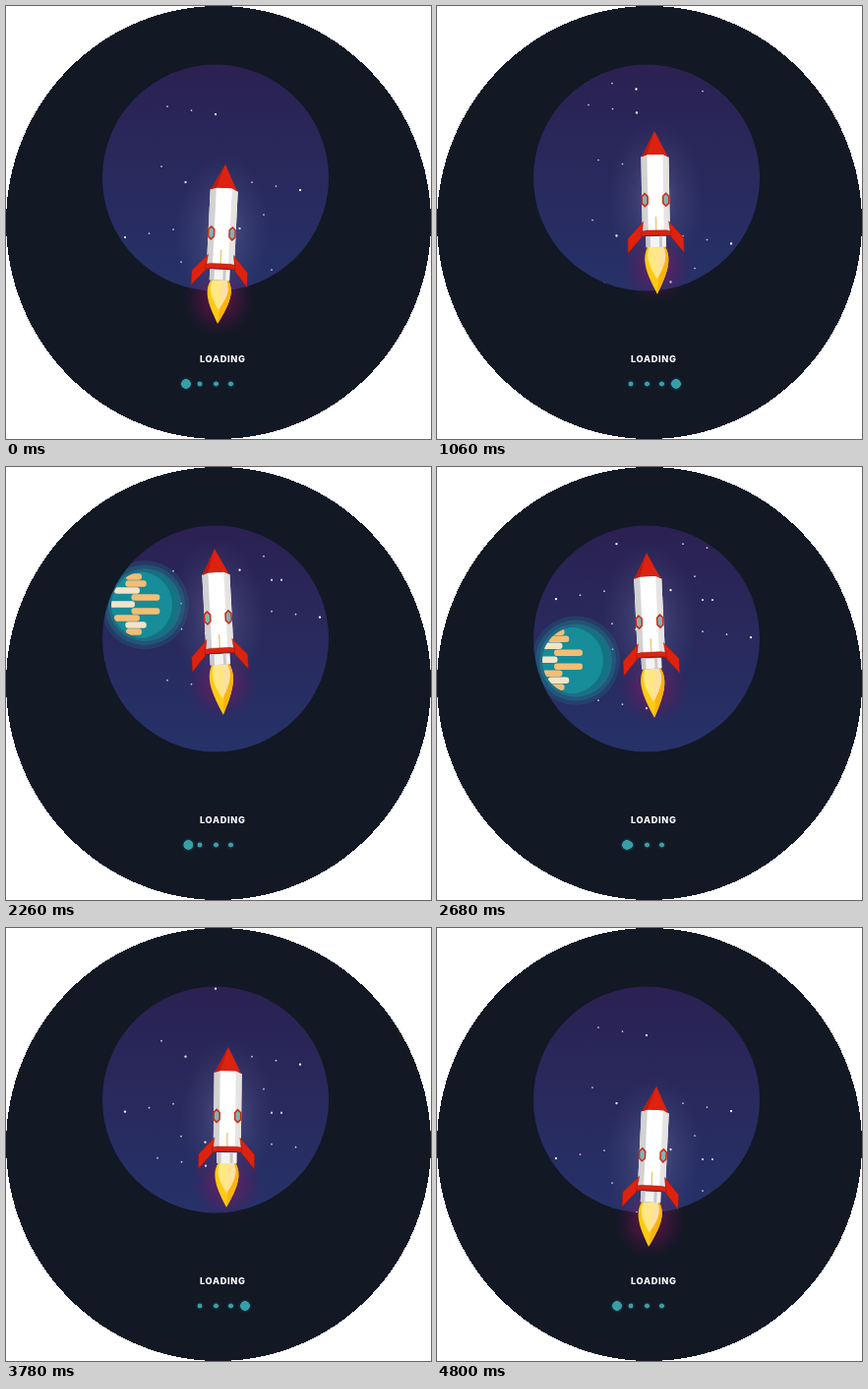
Write an HTML page that moves like this. It is 432x440 px and loops after 4820 ms.

```html
<!DOCTYPE html>
<html lang="en">
<head>
<meta charset="utf-8">
<title>Rocket loader</title>
<style>
  html, body { margin: 0; width: 100%; height: 100%; overflow: hidden; background: #fff; }
  svg { display: block; width: 100%; height: 100%; }
  text { font: 800 9.2px Inter, "Open Sans", sans-serif; letter-spacing: .65px; fill: #fff; }
</style>
</head>
<body>
<svg viewBox="0 0 432 440">
  <defs>
    <linearGradient id="sky" x2="0" y2="1">
      <stop stop-color="#2b2152"/><stop offset="1" stop-color="#263269"/>
    </linearGradient>
    <radialGradient id="halo">
      <stop stop-color="#c8c4e8" stop-opacity=".3"/>
      <stop offset=".45" stop-color="#a8a4d0" stop-opacity=".13"/>
      <stop offset="1" stop-color="#8080c0" stop-opacity="0"/>
    </radialGradient>
    <radialGradient id="heat">
      <stop stop-color="#b01460" stop-opacity=".55"/>
      <stop offset=".5" stop-color="#90105c" stop-opacity=".3"/>
      <stop offset="1" stop-color="#601058" stop-opacity="0"/>
    </radialGradient>
    <clipPath id="port"><circle cx="213" cy="174.5" r="115"/></clipPath>
    <clipPath id="globe"><circle r="34"/></clipPath>
    <filter id="goo" filterUnits="userSpaceOnUse" x="165" y="365" width="95" height="38" color-interpolation-filters="sRGB">
      <feGaussianBlur stdDeviation="1.5"/>
      <feColorMatrix values="1 0 0 0 0  0 1 0 0 0  0 0 1 0 0  0 0 0 7 -2.8" result="blob"/>
      <feGaussianBlur stdDeviation="1.6" result="soft"/>
      <feComponentTransfer in="soft" result="glow"><feFuncA type="linear" slope=".55"/></feComponentTransfer>
      <feMerge><feMergeNode in="glow"/><feMergeNode in="blob"/></feMerge>
    </filter>
    <path id="window" d="M0-6.500L3-3.500V3.500L0 6.500L-3 3.500V-3.500Z" fill="#7fb4ba" stroke="#d3260f" stroke-width="1.500"/>
  </defs>

  <ellipse cx="216" cy="220" rx="216" ry="220" fill="#121824" shape-rendering="crispEdges"/>

  <g clip-path="url(#port)">
    <rect x="98" y="59" width="230" height="231" fill="url(#sky)"/>
    <g id="stars"></g>
    <g id="planet">
      <g fill="#17a2a8">
        <circle r="45" opacity=".16"/><circle r="41" opacity=".22"/><circle r="37" opacity=".3"/>
      </g>
      <circle r="34" fill="#127480"/>
      <g clip-path="url(#globe)">
        <circle cx="-6" r="34" fill="#168d98"/>
        <g id="bands"></g>
      </g>
    </g>
  </g>

  <g id="rocket">
    <ellipse cy="68" rx="48" ry="78" fill="url(#halo)"/>
    <circle cy="138" r="37" fill="url(#heat)"/>
    <g id="flame">
      <path d="M-9 0C-16 13-10 28 0 47.500C10 28 16 13 9 0Z" fill="#ffca12"/>
      <path d="M0 47.500C10 28 16 13 9 0H5Z" fill="#f9b40f"/>
      <path d="M-7 0C-12 10-7 21 0 32C7 21 12 10 7 0Z" fill="#ffe784"/>
      <path d="M0 32C7 21 12 10 7 0H3Z" fill="#ffe0a0"/>
    </g>
    <path d="M-10.500 107H10V118H-10.500Z" fill="#f4f4f4"/>
    <path d="M-10.500 107H-6V118H-10.500ZM3 107H6V118H3Z" fill="#c9c9cc"/>
    <path d="M-14 26L-8 24H8L14 27V103H-14Z" fill="#fff"/>
    <path d="M-14 26L-8 24V103H-14Z" fill="#d2d2d2"/>
    <path d="M8 24L14 27V103H8Z" fill="#e6e4e2"/>
    <path d="M0 0L13.500 27L8 24H-8L-13.500 26Z" fill="#dd220f"/>
    <path d="M0 0L-8 24L-13.500 26Z" fill="#bd1a0d"/>
    <path d="M0 87V103" stroke="#efc071" stroke-width="1.300"/>
    <g fill="#dd220f" stroke="#8a150c" stroke-width=".4">
      <path d="M-13 92L-29 109V124L-15 108Z"/>
      <path d="M13 92L28 109V124L15 108Z"/>
      <path d="M-15 102L-10 101H10L15 102V107L10 106H-10L-15 107Z"/>
    </g>
    <use href="#window" x="-11" y="70"/>
    <use href="#window" x="10.500" y="70"/>
  </g>

  <text x="197" y="362">LOADING</text>
  <g fill="#369fa8" filter="url(#goo)">
    <circle cx="197" cy="384" r="2.700"/>
    <circle cx="213.500" cy="384" r="2.700"/>
    <circle cx="228.500" cy="384" r="2.700"/>
    <circle id="ball" cy="384" r="5"/>
  </g>
</svg>
<script>
const LOOP = 4820, TILE = 236;
const { PI, sin, cos } = Math;
const $ = id => document.getElementById(id);
const add = (parent, tag, attrs) => {
  const el = document.createElementNS('http://www.w3.org/2000/svg', tag);
  for (const k in attrs) el.setAttribute(k, attrs[k]);
  parent.append(el);
};
const place = (id, v) => $(id).setAttribute('transform', v);

// Short rows of stars, the last one bright; a negative gap runs leftwards.
function starRow(x, y, count, drop, gap = 24.5) {
  for (let i = 0; i < count; i++) {
    const bright = i > 0 && i === count - 1;
    for (const tile of [-1, 0, 1])
      add($('stars'), 'circle', {
        cx: x + i * gap, cy: y + i * drop + tile * TILE,
        r: bright ? 1.15 : .85, fill: bright ? '#fff' : '#d3cfe4'
      });
  }
}
starRow(154, 46, 3, 4);
starRow(164, 102, 3, 4);
starRow(250, 179, 3, 4);
starRow(270, 32, 3, 3);
starRow(158, 163, 2, 16);
starRow(178, 260, 2, 6);
starRow(170, 227, 3, 4, -24.5);
starRow(262, 212, 2, 14, -24.5);
starRow(280, 105, 1);
starRow(270, 56, 1);

// Cloud bands zigzag about the middle and repeat around the globe.
for (let i = 0; i < 9; i++) {
  const bulge = sin(PI * i / 8), width = 16 + 14 * bulge;
  const mid = -11 + (i % 2 ? 14 : -14) * bulge ** 2;
  for (const turn of [0, 84])
    add($('bands'), 'rect', {
      x: mid - width / 2 + turn, y: -32 + 7 * i, width, height: 6.5, rx: 3,
      fill: i * 2 % 5 > 2 ? '#f5e3c8' : '#f6bd74'
    });
}

// time, tip x, tip y, tilt
const poses = [
  [0, 223, 161, 2.8],
  [1060, 221, 127, -1],
  [1760, 223, 96, -2.5],
  [2260, 212, 83, -3],
  [3120, 217, 97, -2],
  [3780, 226, 121, .7]
];
const key = i => {
  const n = poses.length, [t, ...v] = poses[(i + n) % n];
  return [t + Math.floor(i / n) * LOOP, ...v];
};

// Smooth closed curve through the poses.
function pose(t) {
  const i = poses.findLastIndex(p => p[0] <= t);
  const [a, b, c, d] = [-1, 0, 1, 2].map(k => key(i + k));
  const span = c[0] - b[0], u = (t - b[0]) / span;
  return [1, 2, 3].map(j => {
    const m = (c[j] - a[j]) / (c[0] - a[0]) * span;
    const n = (d[j] - b[j]) / (d[0] - b[0]) * span;
    return b[j] + u * (m + u * (3 * (c[j] - b[j]) - 2 * m - n + u * (2 * (b[j] - c[j]) + m + n)));
  });
}

const ease = u => (1 - cos(PI * Math.min(1, Math.max(0, u)))) / 2;
const ballX = p => 183 + 60 * (ease(p / .42) - ease((p - .65) / .33));

function draw(t) {
  const p = t / LOOP, since = t - 2260;
  place('stars', `translate(0 ${p * TILE + 4 * sin(PI * p)})`);
  place('planet', `translate(141 ${140 + .1345 * since})`);
  place('bands', `translate(${-.02 * since} 0)`);

  const [x, y, tilt] = pose(t);
  place('rocket', `translate(${x} ${y}) rotate(${tilt})`);
  place('flame', `translate(0 118) scale(1 ${1 - .075 * cos(66 * PI * p)})`);

  $('ball').setAttribute('cx', ballX(p * 2 % 1));
}

const start = performance.now();
function tick() {
  draw((performance.now() - start) % LOOP);
  requestAnimationFrame(tick);
}
tick();
</script>
</body>
</html>
```
